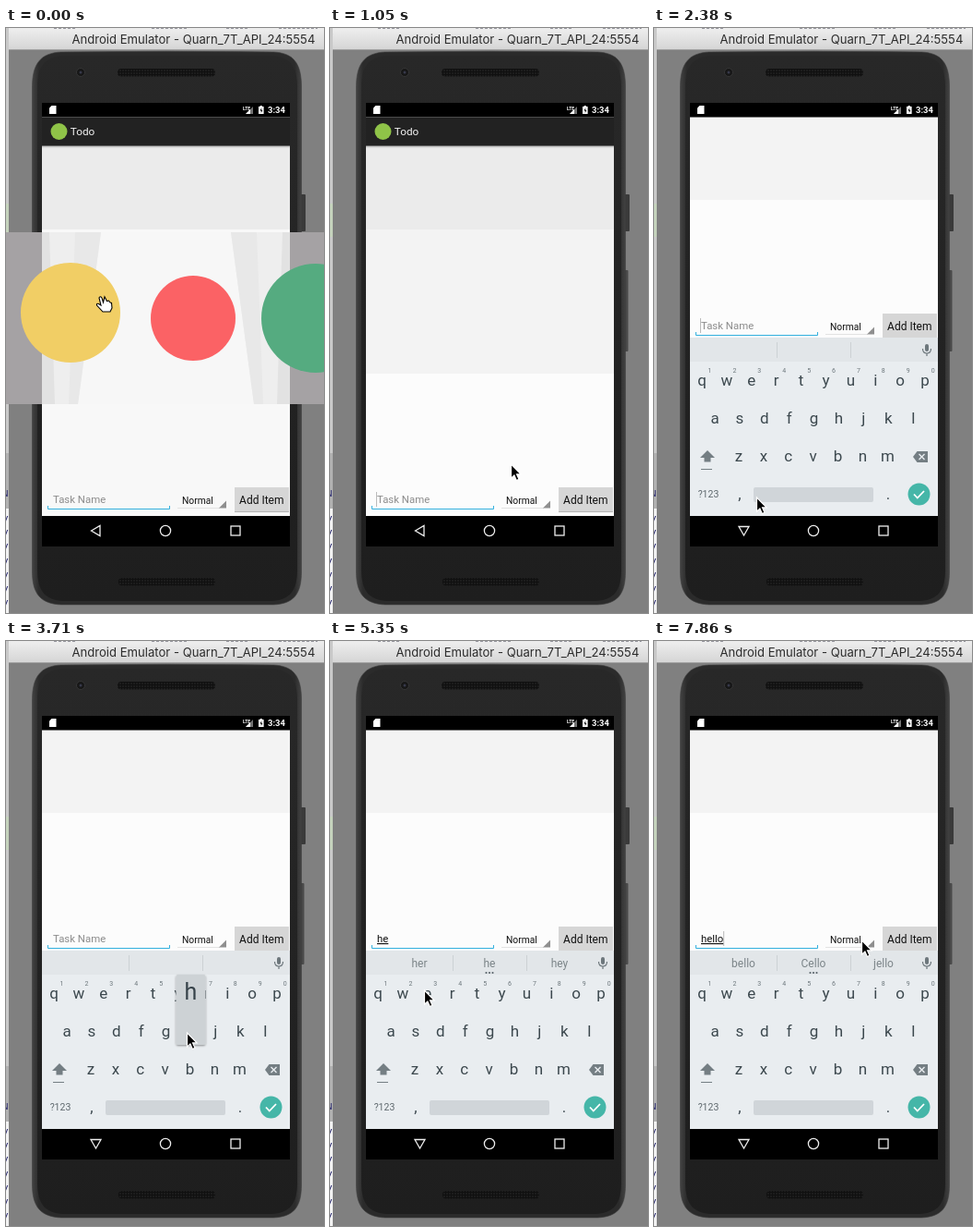
An HTML page that plays this animation: 345 px wide and 633 px high, repeating every 8000 ms.

```html
<!DOCTYPE html>
<html lang="en">
<head>
<meta charset="utf-8">
<title>Todo emulator</title>
<style>
html, body { margin: 0; width: 100%; height: 100%; overflow: hidden; background: #808080; }
svg { display: block; width: 345px; height: 633px; font-family: Roboto, sans-serif; }
.title { font: 13.1px Inter, sans-serif; fill: #2c2c2c; }
.key { font-size: 17px; fill: #3c484e; text-anchor: middle; }
.digit { font-size: 7px; fill: #6d777c; text-anchor: middle; }
.hintbar { font-size: 12px; fill: #7b8488; text-anchor: middle; }
.nav { fill: none; stroke: #eee; stroke-width: 1.3; }
</style>
</head>
<body>
<svg viewBox="0 0 345 633">
  <defs>
    <linearGradient id="bar" x2="0" y2="1"><stop stop-color="#ededed"/><stop offset="1" stop-color="#d5d5d5"/></linearGradient>
    <linearGradient id="rim"><stop stop-color="#424242"/><stop offset=".025" stop-color="#2b2b2b"/><stop offset=".975" stop-color="#2b2b2b"/><stop offset="1" stop-color="#424242"/></linearGradient>
    <linearGradient id="face" x2="0" y2="1"><stop stop-color="#282828"/><stop offset="1" stop-color="#1e1e1e"/></linearGradient>
    <pattern id="mesh" width="3" height="3" patternUnits="userSpaceOnUse"><rect width="3" height="3" fill="#101010"/><circle cx="1" cy="1" r=".7" fill="#303030"/></pattern>
    <clipPath id="view"><rect x="39" y="96.5" width="269" height="431.5"/></clipPath>
    <filter id="soft" x="-30%" y="-20%" width="160%" height="140%"><feDropShadow dx="0" dy="1" stdDeviation="1.2" flood-opacity=".4"/></filter>
  </defs>

  <!-- desktop and window -->
  <rect width="345" height="633" fill="#808080"/>
  <rect width="345" height="6" fill="#ececec"/>
  <path d="M52 .5H75M158 .5H196M239 .5H262M296 .5H338" stroke="#445" stroke-opacity=".5" stroke-dasharray="3 2"/>
  <rect width="3" height="520" fill="#c9c9c9"/>
  <rect y="190" width="3" height="36" fill="#c5d3bd"/>
  <rect y="460" width="3" height="60" fill="#b1b1b1"/>
  <rect y="520" width="3" height="113" fill="#f2f2f2"/>
  <g id="code" font-family="Liberation Mono, monospace" font-size="11" fill="#25256c"></g>
  <path d="M3 23V7Q3 1.5 8 1.5H345V23Z" fill="url(#bar)"/>
  <path d="M3 23.5H345" stroke="#9d9d9d"/>
  <text class="title" x="71.5" y="17">Android Emulator - Quarn_7T_API_24:5554</text>

  <!-- phone body -->
  <rect x="319" y="180" width="6" height="40" rx="1" fill="#3a3a3a"/>
  <rect x="319" y="262" width="4.5" height="88" rx="1" fill="#4a4a4a"/>
  <path d="M28.5 64C28.5 38 38 27 60 26Q175 24.5 290 26C312 27 320.5 38 320.5 64V588C320.5 613 312 623 290 624H60C38 623 28.5 613 28.5 588Z" fill="url(#rim)" stroke="#3d3d3d" stroke-width=".6"/>
  <path d="M34 64C34 41 42 31 62 30H288C308 31 316 41 316 64V586C316 609 308 619 288 620H62C42 619 34 609 34 586Z" fill="url(#face)"/>
  <circle cx="81" cy="48" r="4.5" fill="#171717" stroke="#363636"/>
  <circle cx="81" cy="48" r="1.5" fill="#37394a"/>
  <rect x="121" y="44" width="106" height="8.5" rx="4" fill="url(#mesh)"/>
  <rect x="122" y="595" width="105" height="8.5" rx="4" fill="url(#mesh)"/>
  <rect x="39" y="81" width="269" height="480" fill="#000"/>

  <!-- status bar -->
  <g fill="#fff">
    <path d="M49.5 84H54.5V93H47V86.5Z"/>
    <text x="257" y="88.5" font-size="5" font-weight="700">LTE</text>
    <path d="M260 93L268 85V93Z" opacity=".45"/>
    <path d="M260 93L265 88V93Z"/>
    <path d="M275.6 84H278V85H279.6V93H274V85H275.6Z"/>
    <path d="M277.4 86.2L275.5 89.5H276.8V92L278.4 88.7H277.1Z" fill="#000"/>
    <text x="284" y="92" font-size="9.4" font-weight="700">3:34</text>
  </g>

  <g clip-path="url(#view)">
    <g id="app">
      <rect x="39" y="96" width="269" height="122" fill="#ebebeb"/>
      <rect x="39" y="218" width="269" height="156" fill="#f3f3f3"/>
      <rect x="39" y="374" width="269" height="154" fill="#fcfcfc"/>
      <rect id="wash" x="39" y="218" width="269" height="310" fill="#f8f8f8"/>
      <path d="M39 128.5H308" stroke="#cbcbcb" stroke-width="2"/>
      <rect x="39" y="96" width="269" height="31.6" fill="#222"/>
      <circle cx="57.5" cy="112" r="9" fill="#8fc348"/>
      <text x="69.7" y="116" font-size="11.8" fill="#f3f3f3">Todo</text>
      <text id="task" x="51" y="514" font-size="11.4"></text>
      <path d="M45.5 517V520.5H177.5V517" fill="none" stroke="#33b0de"/>
      <path id="caret" d="M0 502V518" stroke="#aaa" stroke-width=".8"/>
      <path d="M186 519.5H232" stroke="#e2e2e2"/>
      <text x="191" y="514.5" font-size="10.3" fill="#111">Normal</text>
      <path d="M231 519.5H239V511.5Z" fill="#8f8f8f"/>
      <rect x="248" y="497" width="59" height="27" fill="#d6d6d6"/>
      <path d="M248 523.5H307" stroke="#b5b5b5"/>
      <text x="277.3" y="514.5" font-size="12" fill="#111" text-anchor="middle">Add Item</text>
    </g>
    <g id="board">
      <rect x="39" y="335" width="269" height="193" fill="#e9edf0"/>
      <rect x="39" y="335" width="269" height="26" fill="#e2e6e9"/>
      <path d="M133.5 340V357M213.5 340V357" stroke="#ccd1d4"/>
      <g id="hints"></g>
      <g id="dots" fill="#59636a"><circle cx="169.5" cy="359" r="1.1"/><circle cx="173" cy="359" r="1.1"/><circle cx="176.5" cy="359" r="1.1"/></g>
      <rect x="294" y="342" width="4" height="8" rx="2" fill="#6d777c"/>
      <path d="M291.5 347Q291.5 352 296 352T300.5 347M296 352V355" fill="none" stroke="#6d777c" stroke-width="1.2"/>
      <g id="keys"></g>
      <path d="M58 457L66 465H61.5V469.5H54.5V465H50Z" fill="#747e83"/>
      <path d="M51 477.5H63" stroke="#747e83"/>
      <path d="M281 464L285.5 458H297V470H285.5Z" fill="#747e83"/>
      <path d="M287.5 461L293.5 467M293.5 461L287.5 467" stroke="#e9edf0" stroke-width="1.4"/>
      <text x="59" y="508" font-size="10.5" fill="#5f696e" text-anchor="middle">?123</text>
      <text class="key" x="93" y="510">,</text>
      <rect x="108" y="497" width="130" height="16" rx="2" fill="#d0d5d9"/>
      <text class="key" x="254" y="510">.</text>
      <circle cx="287.5" cy="504.5" r="12" fill="#45b6a8"/>
      <path d="M282 504.5L285.8 508.5 293 501" fill="none" stroke="#fff" stroke-width="1.8"/>
      <g id="popup">
        <rect x="-16" y="-62" width="32" height="76" rx="2" fill="#cdd2d5" filter="url(#soft)"/>
        <text id="big" y="-35" font-size="25" fill="#37434a" text-anchor="middle"></text>
      </g>
    </g>
  </g>

  <!-- navigation bar -->
  <path id="back" class="nav" d="M92.5 544L102 538.5V549.5Z"/>
  <circle class="nav" cx="173" cy="544" r="5.6"/>
  <rect class="nav" x="244" y="539" width="10" height="10"/>

  <!-- app switcher -->
  <g id="switcher">
    <rect y="221" width="345" height="186" fill="#a5a2a4"/>
    <rect x="39" y="221" width="269" height="186" fill="#f7f7f7"/>
    <g id="bands">
      <path d="M39 221H103L78 407H39Z" fill="#eee"/>
      <path d="M39 221H47L53 407H39Z" fill="#e2e2e2"/>
      <path d="M75 221H103L78 407H68Z" fill="#e8e8e8"/>
    </g>
    <use href="#bands" transform="matrix(-1 0 0 1 347 0)"/>
    <circle cx="70" cy="308" r="54" fill="#f1ce65"/>
    <circle cx="203" cy="314" r="46" fill="#fb6265"/>
    <circle cx="336" cy="314" r="59" fill="#55ab80"/>
  </g>

  <g id="pointer">
    <path id="arrow" transform="translate(-.5 0) scale(1.06)" d="M0 0V14.2L3.2 11.2 5.5 16.5 8 15.4 5.7 10.3H10Z" fill="#000" stroke="#fff" stroke-width="1.1"/>
    <path id="hand" transform="translate(-2 0)" d="M-1 1Q0-1.5 2 1L3.5 6 5-.2 7.5 4.5 9.5 4 11 6 12.5 6.5 13 12 11 16H3L-3.5 9Q-4 6.5-1.5 7.5L1 9Z" fill="#fff" stroke="#000" stroke-width="1.1"/>
  </g>
</svg>
<script>
const LOOP = 8000;
const $ = id => document.getElementById(id);
const show = (el, on) => el.setAttribute('visibility', on ? 'visible' : 'hidden');
const move = (el, x, y) => el.setAttribute('transform', `translate(${x} ${y})`);
const label = (cls, x, y, s) => `<text class="${cls}" x="${x}" y="${y}">${s}</text>`;

// Keyboard: letter -> centre of its key
const rows = [['qwertyuiop', 52, 382], ['asdfghjkl', 66, 423], ['zxcvbnm', 92, 464]];
const keys = {};
let markup = '';
rows.forEach(([letters, x0, y], row) => [...letters].forEach((c, i) => {
  const x = x0 + 26.9 * i;
  keys[c] = [x, y];
  markup += label('key', x, y + 5, c);
  if (!row) markup += label('digit', x + 8.5, 373, (i + 1) % 10);
}));
$('keys').innerHTML = markup;

let lines = label('', -4, 507, 'N');
for (let i = 0; i < 7; i++) lines += label('', -4, 534 + 15.2 * i, 'v');
$('code').innerHTML = lines;

// The picture only changes at these moments: [first, last, count]
const runs = [[0, 300, 3], [600, 1640, 8], [2080, 2530, 4], [3130, 4160, 8], [4310, 5050, 6],
  [5350, 5350, 1], [5940, 6680, 6], [6980, 7860, 7]];
const ticks = runs.flatMap(([a, b, n]) => Array.from({ length: n }, (_, i) =>
  i && i < n - 1 ? a + i * (b - a) / (n - 1) - 9 : i ? b : a));

const path = [[0, 104, 291], [450, 104, 291], [1036, 197, 472], [1480, 112, 508], [2380, 112, 508],
  [2530, 130, 472], [2980, 130, 472], [3560, 197, 424], [3860, 197, 424], [4160, 170, 400],
  [4590, 103, 378], [5790, 103, 378], [6380, 278, 422], [7120, 278, 422], [7260, 264, 383],
  [7420, 264, 383], [7860, 226, 324]];
const typed = [[0, ''], [3850, 'h'], [4890, 'he'], [6670, 'hel'], [7110, 'hell'], [7550, 'hello']];
const presses = [['h', 3700, 3900], ['e', 4740, 5000], ['l', 6510, 6970], ['l', 7110, 7200], ['o', 7400, 7500]];
const caretOff = [[0, 890], [3130, 3850], [4590, 4740], [5350, 5930]];
const words = {
  '': [], h: ['he', 'his', 'had'], he: ['her', 'he', 'hey'], hel: ['held', "he'll", 'help'],
  hell: ['hello', "he'll", 'hell'], hello: ['bello', 'Cello', 'jello']
};

const within = (t, a, b) => t >= a && t < b;
const last = (list, test) => list.filter(test).pop();

function cursorAt(t) {
  const i = path.findIndex(p => p[0] > t);
  if (i < 0) return path[path.length - 1].slice(1);
  const [t0, x0, y0] = path[i - 1], [t1, x1, y1] = path[i];
  const u = (t - t0) / (t1 - t0), e = u * u * (3 - 2 * u);
  return [x0 + (x1 - x0) * e, y0 + (y1 - y0) * e];
}

let shownText = null;
function setText(s) {
  if (s === shownText) return;
  shownText = s;
  const el = $('task');
  el.textContent = s || 'Task Name';
  el.setAttribute('fill', s ? '#111' : '#8c8c8c');
  el.setAttribute('text-decoration', s ? 'underline' : 'none');
  move($('caret'), s ? 51.3 + el.getComputedTextLength() : 50.5, 0);
  $('hints').innerHTML = words[s].map((w, i) => label('hintbar', 97 + 76 * i, 353, w)).join('');
  show($('dots'), s);
}

function draw(t) {
  const fade = t < 150 ? 1 : t < 300 ? .5 : 0;
  $('switcher').setAttribute('opacity', fade);
  $('wash').setAttribute('opacity', fade);

  const u = Math.min(1, Math.max(0, (t - 1980) / 380));
  const open = 1 - (1 - u) ** 2;
  move($('app'), 0, -188 * open);
  move($('board'), 0, 193 * (1 - open));
  $('back').setAttribute('transform', open ? 'rotate(-90 97.5 544)' : '');

  setText(last(typed, e => e[0] <= t)[1]);
  show($('caret'), !caretOff.some(([a, b]) => within(t, a, b)));

  const press = presses.find(([, a, b]) => within(t, a, b));
  show($('popup'), press);
  if (press) {
    $('big').textContent = press[0];
    move($('popup'), ...keys[press[0]]);
  }

  move($('pointer'), ...cursorAt(t));
  show($('hand'), t < 300);
  show($('arrow'), t >= 300);
}

let shownTick = -1;
const start = performance.now();
function loop() {
  const t = (performance.now() - start) % LOOP;
  const tick = last(ticks, v => v <= t) || 0;
  if (tick !== shownTick) draw(shownTick = tick);
  requestAnimationFrame(loop);
}
loop();
</script>
</body>
</html>
```
